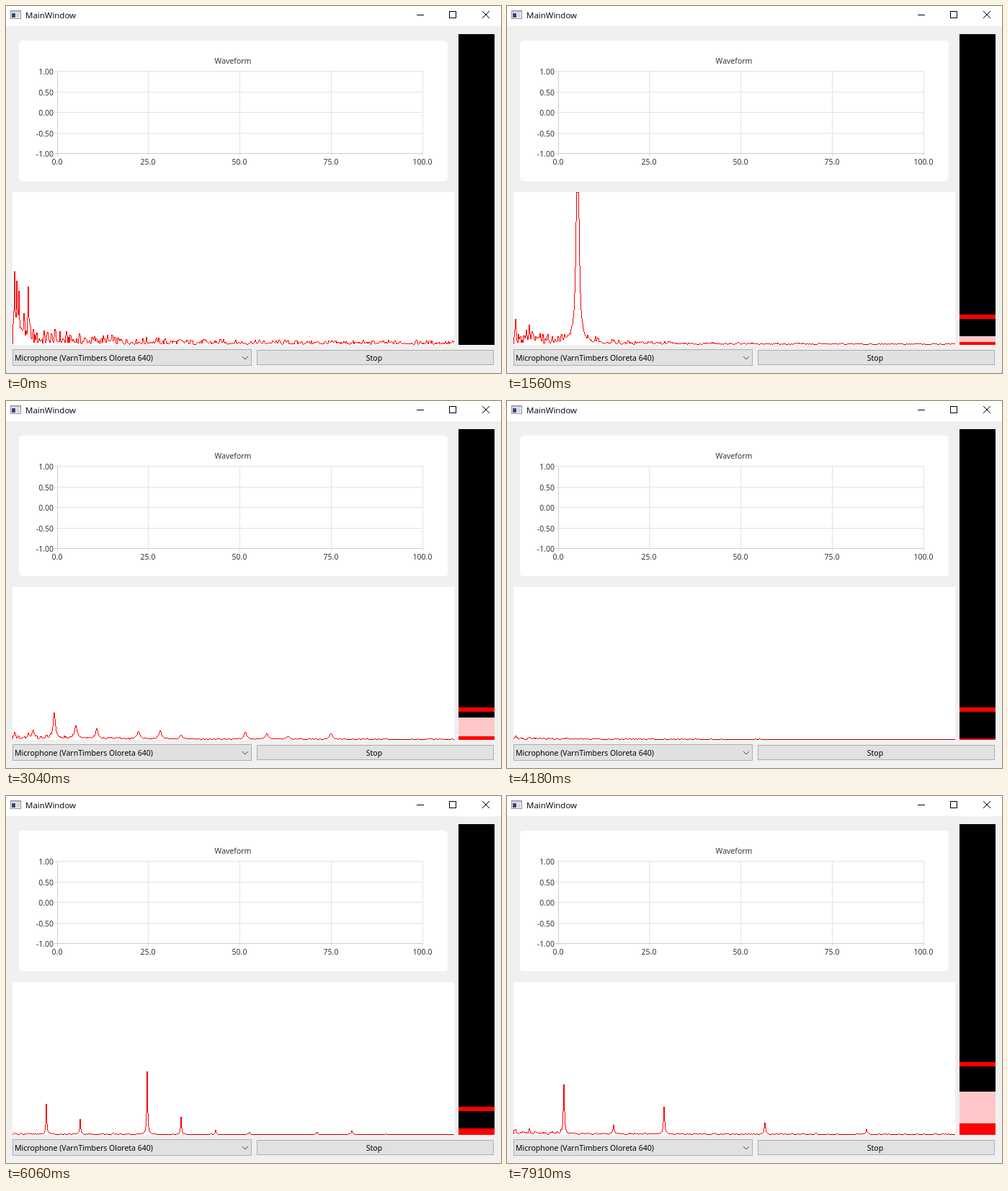
These frames come from a looping animation (687 by 509 pixels, 8 s). An HTML page with a canvas:

```html
<!DOCTYPE html>
<html lang="en">
<head>
<meta charset="utf-8">
<title>MainWindow</title>
<style>
  html, body { margin: 0; width: 100%; height: 100%; overflow: hidden; background: #f0f0f0; }
  svg, canvas { position: absolute; left: 0; top: 0; width: 687px; height: 509px; }
  text { font: 10.5px "Noto Sans", "Open Sans", sans-serif; fill: #000; }
  .caption { font-size: 11.5px; font-family: "Open Sans", "Noto Sans", sans-serif; }
  .chart text { fill: #35353a; }
  .mid { text-anchor: middle; }
  .end { text-anchor: end; }
</style>
</head>
<body>
<svg viewBox="0 0 687 509" shape-rendering="crispEdges">
  <rect width="687" height="509" fill="#f0f0f0"/>
  <rect width="687" height="28" fill="#fff"/>
  <g>
    <rect x="6.5" y="6.5" width="14" height="11" fill="#f4f4f4" stroke="#8c9096"/>
    <rect x="7" y="7" width="13" height="2" fill="#c3c8ce"/>
    <rect x="8" y="10" width="5" height="6" fill="#39427e"/>
    <rect x="14" y="10" width="5" height="6" fill="#d5d8dc"/>
  </g>
  <text class="caption" x="27" y="17">MainWindow</text>
  <g fill="none" stroke="#000">
    <path d="M570 12.5h10M615.5 7.5h9v9h-9z"/>
    <path d="M661 7l10 10M671 7l-10 10" shape-rendering="auto"/>
  </g>
  <rect x="18" y="48" width="595" height="195" rx="5" fill="#fff" shape-rendering="auto"/>
  <g class="chart" id="chart"><text class="mid" x="315" y="80">Waveform</text></g>
  <rect x="9" y="258" width="613" height="212" fill="#fff"/>
  <g fill="#e1e1e1" stroke="#adadad">
    <rect x="9.5" y="476.5" width="331" height="22"/>
    <rect x="348.5" y="477.5" width="328" height="20"/>
  </g>
  <path d="M328 486l4 4 4-4" fill="none" stroke="#444" shape-rendering="auto"/>
  <text x="12" y="492">Microphone (VarnTimbers Oloreta 640)</text>
  <text class="mid" x="511" y="492">Stop</text>
</svg>
<canvas id="view" width="687" height="509"></canvas>
<script>
const LOOP = 8000, LEFT = 9, RIGHT = 622, BASE = 470, TALL = 211;

// Chart grid, ticks and labels
const chart = document.getElementById('chart');
let marks = '';
for (let i = 0; i < 5; i++) {
  const x = Math.round(70.5 + i * 126.9) + 0.5, y = Math.round(90 + i * 28.5) + 0.5;
  const vert = i ? '#e2e2e2' : '#cfcfcf', horiz = i < 4 ? '#e2e2e2' : '#cfcfcf';
  marks += `<path d="M${x} 90V208" stroke="${vert}"/><path d="M67 ${y}H579" stroke="${horiz}"/>
    <text class="mid" x="${x - 0.5}" y="220">${(i * 25).toFixed(1)}</text>
    <text class="end" x="66" y="${y + 4}">${(1 - i / 2).toFixed(2)}</text>`;
}
chart.insertAdjacentHTML('afterbegin', marks);

// Update times: about every 77 ms, with short pauses between runs
const steps = [0];
for (const [from, to] of [
  [90, 780], [920, 1160], [1320, 1560], [1660, 2110], [2180, 2260], [2410, 2580],
  [2720, 3040], [3120, 3490], [3570, 4180], [4270, 4350], [4410, 4730], [4880, 5510],
  [5670, 5740], [5910, 6060], [6120, 6600], [6750, 6900], [7070, 7840], [7910, 7910]
]) {
  const n = Math.round((to - from) / 77);
  for (let i = 0; i <= n; i++) steps.push(Math.round(from + (to - from) * i / Math.max(1, n)));
}

// Peak width, noise floor and strength of each harmonic
const timbres = {
  thud: { width: .7, floor: .21, gains: [.72, .66, .7, .2, .34, .1, .4] },
  hum: { width: .8, floor: .22, gains: [.2, .85, .6, .5, .25, .12, .75] },
  whistle: { width: 2, floor: .07, gains: [1] },
  voice: { width: 2, floor: .14,
    gains: [.3, 1, .56, .42, .05, .32, .32, .17, 0, 0, .28, .23, .12, 0, .23] },
  flute: { width: .7, floor: .24, gains: [.48, .24, .02, 1, .27, .07, .03, 0, .03, .06, .01] },
  tone: { width: .9, floor: .18, gains: [1, .19, .54, .03, .24, .03, .09] }
};

// Time, timbre, level, pitch, noise
const sound = [
  [0, 'thud', 86, 3.1, 13], [420, 'thud', 260, 3.1, 15], [780, 'hum', 66, 3.1, 11],
  [1080, 'thud', 86, 3.1, 12], [1320, 'whistle', 15, 88.5, 12], [1400, 'whistle', 260, 88.5, 11],
  [1560, 'whistle', 335, 88.5, 10], [2110, 'whistle', 220, 85, 9], [2580, 'whistle', 165, 82, 7],
  [2720, 'voice', 84, 30.5, 4], [3040, 'voice', 34, 29.1, 2.8], [3490, 'voice', 42, 31, 3],
  [3650, 'voice', 208, 33, 5], [3950, 'voice', 45, 31, 3], [4180, 'voice', 0, 30, 1.4],
  [4350, 'flute', 2, 43, 1.4], [4410, 'flute', 82, 44, 2], [5200, 'flute', 102, 46, 1.5],
  [5670, 'flute', 50, 47, .9], [6060, 'flute', 87, 46.7, .8], [6300, 'flute', 145, 48, 1.5],
  [6600, 'tone', 130, 60, 2], [6750, 'tone', 211, 63, 4], [7400, 'tone', 160, 68, 3],
  [7910, 'tone', 67, 69.6, 2.2]
];

// Time, peak mark, pale top, red top
const meter = [
  [0, 470, 470, 470], [90, 464, 470, 470], [1160, 464, 470, 470], [1560, 428, 458, 466],
  [1960, 425, 436, 458], [3040, 425, 439, 465], [4180, 425, 468, 468], [6060, 431, 461, 461],
  [6750, 369, 405, 440], [7910, 369, 410, 454]
];

const mix = (a, b, u) => a + (b - a) * u;
const rand = (i, seed) => {
  const v = Math.sin(i * 12.9898 + seed * 78.233) * 43758.5453;
  return v - Math.floor(v);
};

// Neighbouring rows around t and the share of the second one
function around(rows, t) {
  let i = rows.length - 1;
  while (i && rows[i][0] > t) i--;
  const a = rows[i], b = rows[i + 1] || a;
  return [a, b, a === b ? 0 : (t - a[0]) / (b[0] - a[0])];
}

// Harmonics as [x, height, width], slightly stretched upwards
function harmonics(name, level, pitch, sway, seed) {
  const { width, gains } = timbres[name];
  return gains.map((gain, i) => {
    const k = i + 1;
    const h = gain * level * (1 + sway * (rand(k, seed + 7) - .5));
    return [Math.round(LEFT + pitch * k * (1 + .0008 * k)), h, width];
  });
}

function spectrum(t, seed) {
  const [a, b, u] = around(sound, t);
  const sway = 2 * u * (1 - u), noise = mix(a[4], b[4], u);
  const floor = noise * mix(timbres[a[1]].floor, timbres[b[1]].floor, u);
  const peaks = a[1] === b[1]
    ? harmonics(a[1], mix(a[2], b[2], u), mix(a[3], b[3], u), sway, seed)
    : [...harmonics(a[1], a[2] * (1 - u), a[3], sway, seed),
       ...harmonics(b[1], b[2] * u, b[3], sway, seed)];
  peaks.push([12, noise * 2, .8], [31, noise * 1.6, .8]);

  const heights = [0];
  for (let x = LEFT + 1; x <= RIGHT; x++) {
    const d = x - LEFT, bin = d / 1.2, n = Math.floor(bin);
    const r = mix(rand(n, seed) ** 2, rand(n + 1, seed) ** 2, bin - n);
    let h = 2.2 * r * (noise * Math.exp(-d / 105) + floor);
    for (const [px, ph, pw] of peaks) h += ph / (1 + ((x - px) / pw) ** 2);
    heights.push(Math.min(TALL, Math.round(h)));
  }
  return heights;
}

const ctx = document.getElementById('view').getContext('2d');
function box(color, x, y, w, h) {
  ctx.fillStyle = color;
  ctx.fillRect(x, y, w, h);
}

function draw(t, seed) {
  ctx.clearRect(0, 0, 687, 509);
  const hs = spectrum(t, seed);
  for (let i = 0; i < hs.length - 1; i++) {
    const low = Math.min(hs[i], hs[i + 1]), high = Math.max(hs[i], hs[i + 1]);
    box(high ? '#f00' : '#b8000c', LEFT + i, BASE - 1 - high, 1, Math.max(1, high - low));
  }
  const [a, b, u] = around(meter, t);
  const [peak, pale, red] = [1, 2, 3].map(k => Math.round(mix(a[k], b[k], u)));
  box('#000', 628, 39, 50, BASE - 39);
  box('#ffc8c8', 628, pale, 50, BASE - pale);
  box('#f00', 628, red, 50, BASE - red);
  box('#f00', 628, peak, 50, Math.min(6, BASE - peak));
}

let shown = -1;
const start = performance.now();
function tick() {
  const t = (performance.now() - start) % LOOP;
  let i = steps.length - 1;
  while (steps[i] > t) i--;
  if (i !== shown) draw(steps[shown = i], i + 1);
  requestAnimationFrame(tick);
}
tick();
</script>
</body>
</html>
```
